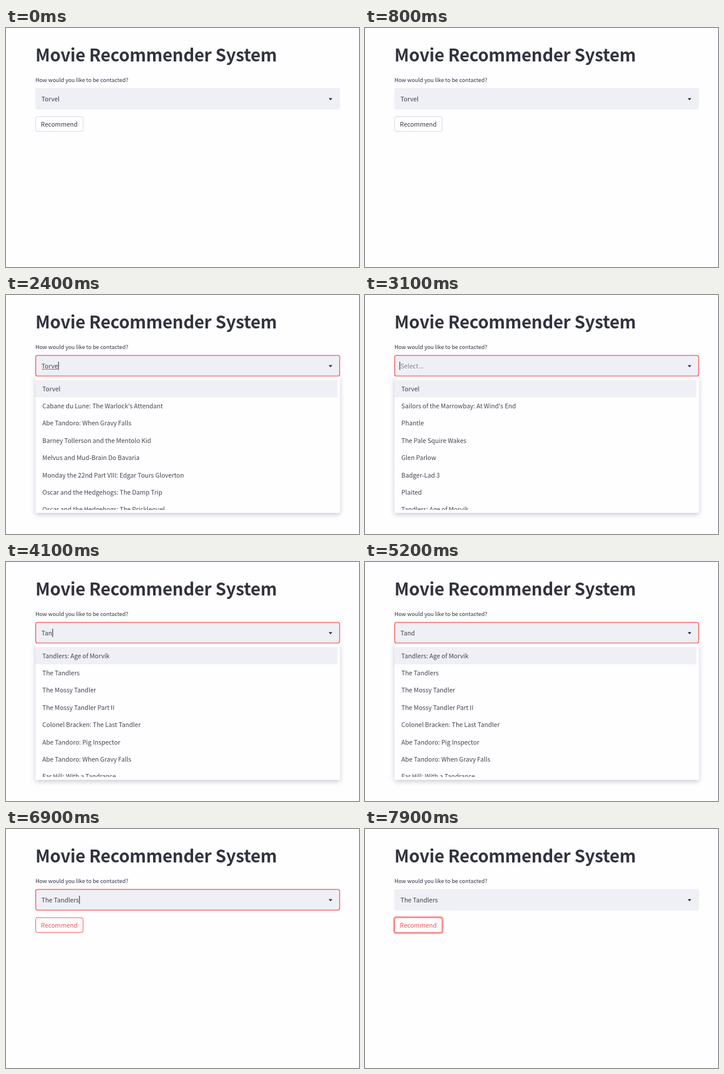
These frames come from a looping animation (600x407 px, 8000 ms). An HTML page:

```html
<!DOCTYPE html>
<html lang="en">
<head>
<meta charset="utf-8">
<title>Movie Recommender System</title>
<style>
  html, body { margin: 0; width: 100%; height: 100%; overflow: hidden; background: #fefdff; }
  svg { display: block; width: 100vw; height: 100vh; }
  text {
    font: 400 10.6px "Noto Sans CJK JP", "Noto Sans CJK SC", "Noto Sans CJK", "Open Sans", sans-serif;
    fill: #31333f;
    white-space: pre;
  }
  #title { font-size: 29.2px; font-weight: 700; letter-spacing: -.005em; }
  #label { font-size: 9.27px; }
  #rows text { fill: #43454f; }
</style>
</head>
<body>
<svg viewBox="0 0 600 407">
  <defs>
    <clipPath id="listClip"><rect x="50" y="139" width="518" height="227"/></clipPath>
    <filter id="shadow" x="-10%" y="-10%" width="120%" height="125%">
      <feDropShadow dx="0" dy="3" stdDeviation="4" flood-color="#000" flood-opacity=".2"/>
    </filter>
  </defs>
  <rect width="600" height="407" fill="#fefdff"/>

  <g id="anchor" transform="translate(23.6 32.7) scale(.493)" fill="none" stroke="#31333f"
     stroke-width="2" stroke-linecap="round" stroke-linejoin="round">
    <path d="M10 13a5 5 0 0 0 7.54.54l3-3a5 5 0 0 0-7.07-7.07l-1.72 1.71"/>
    <path d="M14 11a5 5 0 0 0-7.54-.54l-3 3a5 5 0 0 0 7.07 7.07l1.71-1.71"/>
  </g>
  <text id="title" x="50" y="57">Movie Recommender System</text>
  <text id="label" x="50" y="91.7">How would you like to be contacted?</text>

  <rect id="ring" x="49" y="149.8" width="83.2" height="27.6" rx="4" fill="none"
        stroke="#ff4b4b" stroke-width="2.6"/>
  <rect id="button" x="50.4" y="151" width="80.6" height="25.2" rx="2.8" fill="#fffeff"/>
  <text id="caption" x="90.6" y="167.5" text-anchor="middle">Recommend</text>

  <rect id="select" x="50.5" y="102.8" width="516.6" height="35.3" rx="3" fill="#eff0f5" stroke-width="1.3"/>
  <path d="M548.4 119.6h6.4l-3.2 3.4z" fill="#25272f"/>
  <text id="value" x="60.3" y="124.6"></text>
  <rect id="squiggle" x="61" y="126" height="1" fill="#f04a4a"/>
  <rect id="caret" y="113.6" width="1.1" height="14" fill="#2b2d38"/>

  <g id="menu">
    <rect x="50" y="138.8" width="517.5" height="232.2" rx="3" fill="#fefdff" filter="url(#shadow)"/>
    <rect id="highlight" x="50" width="513" height="29.4" fill="#eff0f5"/>
    <g id="rows" clip-path="url(#listClip)"></g>
  </g>
</svg>
<script>
const LOOP = 8000, ROW = 29.4, RED = '#f9504f';
const $ = id => document.getElementById(id);
const set = (id, name, v) => $(id).setAttribute(name, v);
const show = (id, on) => set(id, 'visibility', on ? 'visible' : 'hidden');
const clamp = v => Math.max(0, Math.min(1, v));
const within = (t, a, b) => t >= a && t < b;

const first = 'Torvel';
const picked = 'The Tandlers';
const sequel = 'Tandlers: Age of Morvik';
const nature = 'Abe Tandoro: When Gravy Falls';

const all = [first, "Sailors of the Marrowbay: At Wind's End", 'Phantle',
  'The Pale Squire Wakes', 'Glen Parlow', 'Badger-Lad 3', 'Plaited', sequel];
const nearFirst = [first, "Cabane du Lune: The Warlock's Attendant", nature,
  'Barney Tollerson and the Mentolo Kid', 'Melvus and Mud-Brain Do Bavaria',
  'Monday the 22nd Part VIII: Edgar Tours Gloverton',
  'Oscar and the Hedgehogs: The Damp Trip', 'Oscar and the Hedgehogs: The Pricklequel'];
const found = [sequel, picked, 'The Mossy Tandler', 'The Mossy Tandler Part II',
  'Colonel Bracken: The Last Tandler', 'Abe Tandoro: Pig Inspector', nature,
  'Far Hill: With a Tandrance'];
const byLetter = [first, sequel, 'Phantle', 'The Pale Squire Wakes',
  'Glen Parlow', 'Plaited', picked, 'The Mossy Tandler'];
const byPair = [first, ...found.slice(0, 7)];

// [start, field text, listed options]
const steps = [
  [0, first, all],
  [1900, 'Torve', nearFirst],
  [2500, 'Tor', nearFirst],
  [2600, 'T', byLetter],
  [2700, '', all],
  [3600, 'T', byLetter],
  [3900, 'Ta', byPair],
  [4100, 'Tan', found],
  [4400, 'Tand', found],
  [6400, picked, found]
];
const caretOn = [[1200, 1700], [1900, 2700], [3100, 4900], [5400, 5900], [6600, 7200]];

const rows = all.map((_, i) => {
  const row = document.createElementNS('http://www.w3.org/2000/svg', 'text');
  row.setAttribute('x', 61.8);
  row.setAttribute('y', 163.6 + ROW * i);
  $('rows').append(row);
  return row;
});

function anchorOpacity(t) {
  if (!within(t, 300, 800)) return 0;
  return t < 500 ? .4 : t < 700 ? .6 : .3;
}

function render(t) {
  const [, text, options] = steps.findLast(s => t >= s[0]);
  const open = within(t, 1200, 6400);
  const focused = within(t, 1200, 7200);
  const hovered = t >= 6900;

  set('anchor', 'opacity', anchorOpacity(t));

  $('value').textContent = text || 'Select...';
  set('value', 'opacity', text ? .92 : .58);
  const width = text ? $('value').getComputedTextLength() : 0;
  set('select', 'stroke', focused ? RED : '#eff0f5');
  show('caret', caretOn.some(([a, b]) => within(t, a, b)));
  set('caret', 'x', text ? 60.9 + width : 58.6);
  show('squiggle', text === 'Torve');
  set('squiggle', 'width', Math.max(0, width - 1));

  show('menu', open);
  set('menu', 'opacity', clamp(.5 + (t - 1200) / 200));
  set('rows', 'opacity', clamp(.6 + (t - 1200) / 500));
  set('highlight', 'y', 144.8 + (t < 5500 ? 0 : ROW));
  rows.forEach((row, i) => row.textContent = options[i]);

  set('button', 'stroke', hovered ? RED : '#d6d6dc');
  $('caption').style.fill = hovered ? '#ef5655' : '#3a3c47';
  set('ring', 'opacity', .5 * clamp((t - 7150) / 150));
}

function frame(now) {
  render(now % LOOP);
  requestAnimationFrame(frame);
}
render(0);
requestAnimationFrame(frame);
</script>
</body>
</html>
```
